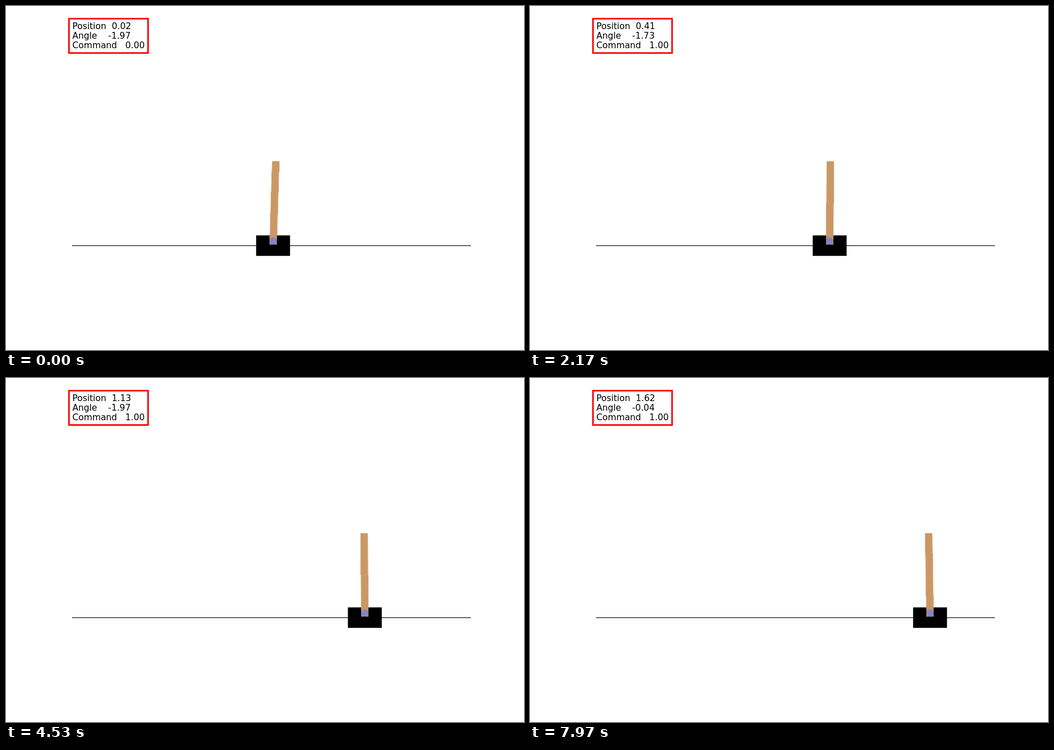
An HTML page with a canvas that plays this animation: 917 by 611 pixels, repeating every 8000 ms.

```html
<!DOCTYPE html>
<html>
<head>
<meta charset="utf-8">
<style>
html, body { margin: 0; width: 100%; height: 100%; overflow: hidden; background: #fff; }
canvas { display: block; }
</style>
</head>
<body>
<canvas id="stage" width="917" height="611"></canvas>
<script>
const LOOP = 8000, STEP = 100 / 3, FRAMES = 240;
const ctx = document.getElementById('stage').getContext('2d');

// The cart is drawn on a small canvas that is scaled up smoothly.
const scene = document.createElement('canvas');
scene.width = 600;
scene.height = 400;
const pen = scene.getContext('2d');

// The cart eases across with a quick start and a slow stop.
const cartPosition = f => .819 - .799 * Math.cos(Math.PI * (f / 233) ** .87);

// Sideways offset of the pole's tip, in scene pixels.
const poleLean = f => Math.round(Math.abs(f - 200) / 25 - 4);

const angleReading = f => -.2 - 1.8 * Math.cos(2 * Math.PI * (f * 5 / 17 - .03));

function rect(color, x, y, w, h) {
  pen.fillStyle = color;
  pen.fillRect(x, y, w, h);
}

// A soft straight edge below, whole-pixel rows on top.
function drawPole(center, lean) {
  const top = 172, rows = 126, left = center - 5, width = 11;
  pen.fillStyle = '#ca9865';
  pen.beginPath();
  pen.moveTo(left, top + rows);
  pen.lineTo(left + lean, top);
  pen.lineTo(left + lean + width, top);
  pen.lineTo(left + width, top + rows);
  pen.fill();
  for (let r = 0; r < rows; r++) {
    const shift = Math.round(lean * (1 - (r + .5) / rows));
    pen.fillRect(left + shift, top + r, width, 1);
  }
}

function drawScene(center, lean) {
  rect('#fff', 0, 0, 600, 400);
  rect('#000', 0, 299, 600, 1);
  rect('#000', center - 25, 284, 51, 31);
  drawPole(center, lean);
  pen.fillStyle = '#8184cb';
  pen.beginPath();
  pen.arc(center + .5, 292.5, 5.5, 0, 2 * Math.PI);
  pen.fill();
}

function drawPanel(position, angle, command) {
  ctx.strokeStyle = '#f00';
  ctx.lineWidth = 2.78;
  ctx.strokeRect(111.5, 22.5, 140, 61);
  ctx.fillStyle = '#000';
  ctx.font = '15.4px "DejaVu Sans", sans-serif';
  const lines = [
    'Position  ' + position.toFixed(2),
    'Angle    ' + angle.toFixed(2).padStart(5),
    'Command   ' + command.toFixed(2)
  ];
  lines.forEach((line, i) => ctx.fillText(line, 117.5, 41 + 17 * i));
}

function draw(f) {
  const position = cartPosition(f);
  drawScene(Math.floor(300 + 125 * position), poleLean(f));
  ctx.fillStyle = '#fff';
  ctx.fillRect(0, 0, 917, 611);
  ctx.drawImage(scene, 117.06, 73.32, 705.7, 470.5);
  drawPanel(position, angleReading(f), f > 0 ? 1 : 0);
}

function tick() {
  const t = performance.now() % LOOP;
  draw(Math.min(FRAMES - 1, Math.floor((t + 3.4) / STEP)));
  requestAnimationFrame(tick);
}
tick();
</script>
</body>
</html>
```
